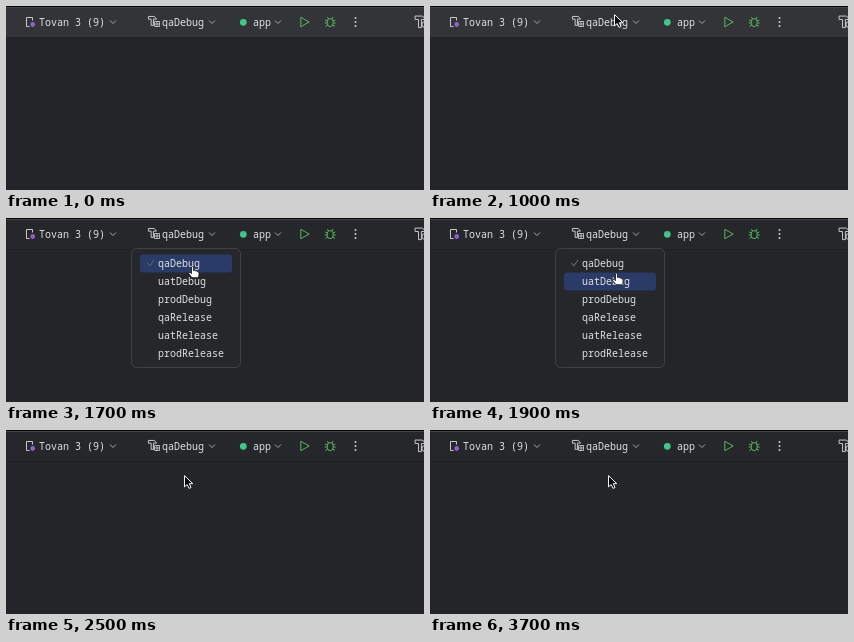
Recreate the animation shown at these times as an HTML page with a canvas. Size 418x184 px, loop 3800 ms.

```html
<!DOCTYPE html>
<html lang="en">
<head>
<meta charset="utf-8">
<title>Build variant menu</title>
<style>
html, body { margin: 0; width: 100%; height: 100%; overflow: hidden; background: #242528; }
canvas { display: block; width: 418px; height: 184px; }
</style>
</head>
<body>
<canvas id="stage"></canvas>
<script>
const W = 418, H = 184, LOOP = 3800, STEP = 100;
const OPEN = 1300, CLOSE = 2400;
const VARIANTS = ['qaDebug', 'uatDebug', 'prodDebug', 'qaRelease', 'uatRelease', 'prodRelease'];
const TEXT = '#dfe1e5', ICON = '#c6c8cc', GREY = '#a4a6aa', GREEN = '#57b45e';

// Pointer path: time, x, y
const PATH = [
  [100, 318, 158], [300, 317, 158], [400, 247, 98], [500, 201, 55],
  [600, 191, 34], [700, 186, 19], [800, 184, 11], [900, 184, 8],
  [1300, 184, 8], [1400, 184, 13], [1500, 185, 25], [1600, 186, 39],
  [1700, 186, 48], [1800, 186, 53], [1900, 186, 55], [2000, 185, 57],
  [2100, 182, 54], [2200, 179, 48], [2300, 178, 45], [LOOP, 178, 45]
];

const canvas = document.getElementById('stage');
const dpr = window.devicePixelRatio || 1;
canvas.width = W * dpr;
canvas.height = H * dpr;
const ctx = canvas.getContext('2d');
ctx.scale(dpr, dpr);

function rect(x, y, w, h, color) {
  ctx.fillStyle = color;
  ctx.fillRect(x, y, w, h);
}

function roundRect(x, y, w, h, r, fill, stroke) {
  ctx.beginPath();
  ctx.roundRect(x, y, w, h, r);
  ctx.fillStyle = fill;
  ctx.fill();
  if (stroke) {
    ctx.strokeStyle = stroke;
    ctx.lineWidth = 1;
    ctx.stroke();
  }
}

function strokePath(d, color, width = 1) {
  ctx.strokeStyle = color;
  ctx.lineWidth = width;
  ctx.stroke(new Path2D(d));
}

function dot(x, y, r, color) {
  ctx.beginPath();
  ctx.arc(x, y, r, 0, Math.PI * 2);
  ctx.fillStyle = color;
  ctx.fill();
}

function label(text, x, y) {
  ctx.font = '500 10px "Noto Sans Mono", "DejaVu Sans Mono", monospace';
  ctx.fillStyle = TEXT;
  ctx.fillText(text, x, y);
}

function chevron(x) {
  strokePath(`M${x - 3} 14.5l3 3 3-3`, GREY);
}

function hammer(x, y, s) {
  ctx.save();
  ctx.translate(x, y);
  ctx.scale(s, s);
  strokePath('M.5 .5H7L9.5 3.5H6V10.5H3.5V3.5H.5Z', ICON, 1 / s);
  ctx.restore();
}

function bug() {
  strokePath('M321.3 15.5a2.9 2.9 0 0 1 5.8 0v2.2a2.9 2.9 0 0 1-5.8 0Z', GREEN);
  strokePath('M322.4 12.9l-1-1.9M326 12.9l1-1.9M321.3 15l-2.2-1M327.1 15l2.2-1' +
    'M321.3 17h-2.6M327.1 17h2.6M321.6 19l-2.2 1.4M326.8 19l2.2 1.4', GREEN);
}

function toolbar(t) {
  rect(0, 0, W, 31, t < OPEN ? '#333437' : '#26272a');
  rect(0, 0, W, 1, '#060607');
  rect(0, 1, W, 1, '#434447');
  rect(0, 31, W, 1, '#1f2022');
  if (t >= OPEN && t < OPEN + 300) rect(126, 2, 97, 29, '#36373b');

  strokePath('M26.5 14.5V11.5H20.5V20.5H23.5', ICON);
  dot(26.7, 18.5, 2.4, '#8a62cc');
  label('Tovan 3 (9)', 33, 20);
  chevron(107);

  hammer(142, 10, 0.9);
  strokePath('M148.5 15.5H153.5V20.5H148.5ZM148.5 18H153.5M151 15.5V20.5', ICON, 0.9);
  label('qaDebug', 156, 20);
  chevron(206);

  dot(237.3, 16.3, 3.4, '#3fc788');
  label('app', 247, 20);
  chevron(272);

  strokePath('M294.8 11.3V20.7L303.2 16Z', GREEN);
  bug();
  for (const y of [12, 16, 20]) dot(349.5, y, 1, '#ced0d6');
  hammer(408.5, 9.5, 1.15);
  strokePath('M419 15.5a3 3 0 0 0 0 6', ICON);
}

function menu(active) {
  roundRect(125.5, 30.5, 109, 119, 5, '#26272b', '#404145');
  roundRect(134, 36.5 + active * 18, 92, 18, 3, '#293b66');
  strokePath('M141.5 45l2.3 3 4.2-6', active === 0 ? '#596485' : '#74767b');
  VARIANTS.forEach((name, i) => label(name, 152, 49 + i * 18));
}

function pointerAt(t) {
  const i = PATH.findIndex(p => p[0] > t);
  if (i < 1) return null;
  const [t0, x0, y0] = PATH[i - 1], [t1, x1, y1] = PATH[i];
  const k = (t - t0) / (t1 - t0);
  return { x: x0 + (x1 - x0) * k, y: y0 + (y1 - y0) * k };
}

function shape(d, fill, stroke, width) {
  const path = new Path2D(d);
  ctx.lineJoin = 'round';
  ctx.lineWidth = width;
  ctx.strokeStyle = stroke;
  ctx.fillStyle = fill;
  ctx.fill(path);
  ctx.stroke(path);
  ctx.lineJoin = 'miter';
}

function pointer(p, hand) {
  ctx.save();
  ctx.translate(p.x, p.y);
  if (hand) {
    shape('M-.5 1Q.5-.3 1.5 1V4.5Q3 3.7 3.7 5Q5.2 4.4 5.7 5.8Q7 5.5 7 7V9Q6.7 10.5 5.7 11.7H0' +
      'L-3.3 7.5Q-3.3 6-1.8 6.5L-.5 7.7Z', '#fff', '#111', 0.8);
  } else {
    shape('M.5.6V11.9L3.2 9.5L5 13.4L7 12.5L5.3 8.7H8.8Z', '#0b0b0c', '#f4f4f4', 1);
  }
  ctx.restore();
}

function draw(t) {
  rect(0, 0, W, H, '#242528');
  toolbar(t);
  const p = pointerAt(t);
  if (t >= OPEN && t < CLOSE) {
    menu(Math.max(0, Math.min(5, Math.floor((p.y - 36) / 18))));
  }
  if (p) pointer(p, t >= 1600 && t < 2200);
}

function tick() {
  const t = performance.now() % LOOP;
  draw(Math.floor(t / STEP) * STEP);
  requestAnimationFrame(tick);
}
tick();
</script>
</body>
</html>
```
